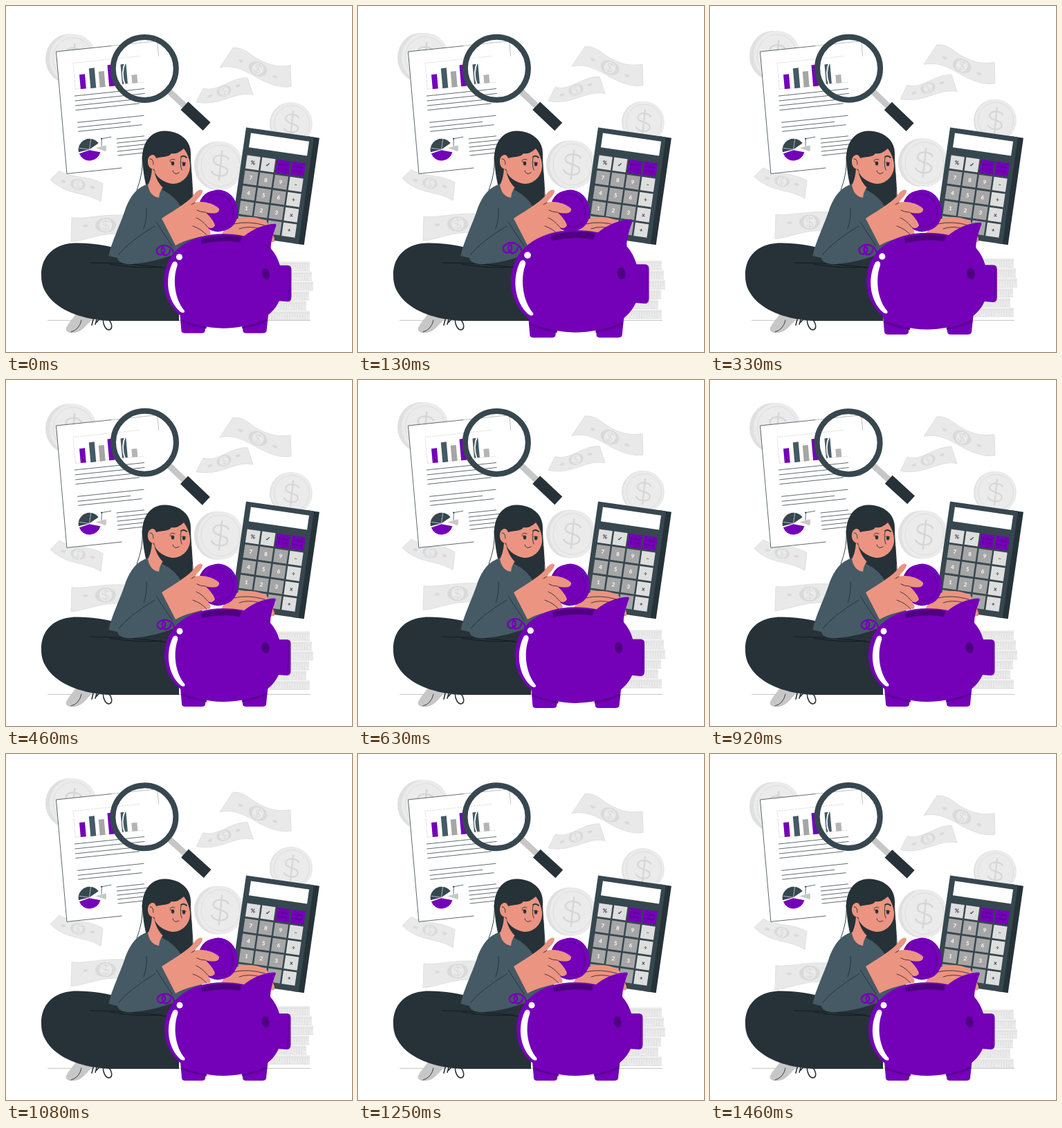
Recreate the animation shown at these times as an HTML page. Size 500 px wide and 500 px high, loop 1500 ms.

```html
<!DOCTYPE html>
<html lang="en">
<head>
<meta charset="utf-8">
<title>Saving money</title>
<style>
  html, body { margin: 0; width: 100%; height: 100%; overflow: hidden; background: #fff; }
  svg { display: block; width: 100%; height: 100%; }
  text { font-family: Lato, sans-serif; text-anchor: middle; }
  .line { fill: none; stroke: #263238; stroke-width: .9; stroke-linecap: round; stroke-linejoin: round; }
  .thin { fill: none; stroke: #263238; stroke-width: .3; }
  .faint { fill: none; stroke: #dcdcdc; stroke-width: .9; }
  .dark { fill: #263238; }
  .slate { fill: #455a64; }
  .purple { fill: #7400b8; }
  .shade { fill: none; stroke: #5d0094; }
  .deep { fill: #4f0080; }
  .skin { fill: #eb9481; }
  .gray { fill: #ebebeb; }
</style>
</head>
<body>
<svg viewBox="0 0 500 500">
  <path class="thin" d="M60 454.300H440"/>
  <g id="floating"></g>

  <g id="paper" transform="translate(72.500 66) rotate(-6) skewX(-1)"></g>

  <g id="lens">
    <path d="M173 80Q165 97 172 114" fill="none" stroke="#fff" stroke-width="1.800"/>
    <g transform="translate(200.500 90.500) rotate(43)">
      <path fill="#c7c7c7" d="M47 -4.500H86V4.500H47Z"/>
      <path class="dark" d="M78.500 -8H122.500V8H78.500Z"/>
    </g>
    <circle cx="200.200" cy="90.500" r="45.500" fill="none" stroke="#37474f" stroke-width="8"/>
  </g>

  <g id="calculator" transform="translate(347 175.500) rotate(8.200)"></g>

  <g id="woman">
    <path class="dark" d="M230 180.500C206 180 196 202 197 222C198 238 200 250 203 262L230 290L269 270C270 255 266 240 267 215C268 193 250 181 230 180.500Z"/>
    <path class="line" d="M197 218C198 238 194 252 189 266M266 215Q268 240 270.500 279"/>
    <path fill="#c7c7c7" d="M86.500 467C88 460 97 452 102 443L128 450C120 456 114 466 106 470C98 474 87 473 86.500 467Z"/>
    <path class="line" d="M94 471Q106 468 109 454"/>
    <path class="line" style="stroke-width:1.600" d="M142 449C138 456 143 468 149 468C156 466 152 454 145 451M127 449L124 461M132 450L129 460M137 450L131 457"/>
    <path class="dark" d="M51 390C50 360 72 342 103 342.500C126 343 146 346 164 351L250 352V455H150C110 453 82 441 66 425C55 413 51 403 51 390Z"/>
    <path class="line" style="stroke:#11191d" d="M122 371Q180 371 232 379M150 373Q190 380 225 377"/>
    <path class="slate" d="M206 257C190 261 180 274 173 292C166 314 152 342 148.500 361L161 364C162 371 172 374 183 373C205 371 224 366 240 360L285 340L268 282L232 262Z"/>
    <path class="dark" d="M226 254L268 240L270 281L254 292Q246 276 225 265Z"/>
    <path class="line" d="M203 292Q204 308 199 322M163 359Q178 340 215 318M217 312L240 347"/>
    <path class="skin" d="M211 235Q210 250 205 259Q208 275 221 277Q222 264 233 256Z"/>
    <path class="dark" d="M214 238Q220 253 240 257L227 263Q217 253 214 238Z"/>
    <path class="skin" d="M217 220C227 217 235 219 239 213Q247 215 257 206C262 213 266 222 266 231C266 245 255 257 241 257C228 256 219 247 214 236C206 236 203 226 206 219C210 213 215 214 217 220Z"/>
    <path class="line" d="M208 221Q213 220 213 229M253 219Q251 229 254 237M241 238Q243 245 250 241M237 223Q240 220 244 222"/>
    <path class="line" style="stroke-width:1.800" d="M253 218Q257 215 261 219"/>
    <ellipse class="dark" cx="241" cy="227.500" rx="2.200" ry="3"/>
    <ellipse class="dark" cx="257" cy="228.500" rx="2.200" ry="3"/>
    <path class="line" d="M237 225L242 226M254 226L260 227"/>

    <path class="skin" d="M308 338C313 324 323 311 338 306C351 303 368 306 377 312Q384 325 388 336V341H308Z"/>
    <path class="line" d="M329 315Q350 310 374 317M337 322Q350 317 368 322"/>
    <g transform="rotate(-15 306 296)">
      <ellipse class="purple" cx="304" cy="296" rx="26" ry="30"/>
      <ellipse class="purple" cx="309" cy="296" rx="26" ry="30"/>
      <path class="shade" d="M296 268Q282 279 284 296Q285 315 299 325"/>
      <ellipse class="shade" cx="309" cy="296" rx="19" ry="24"/>
    </g>
    <path class="skin" d="M225 307C240 297 258 287 270 275C275 267 281 263 284 267C284 273 276 279 273 284C286 281 301 286 308 293C309 300 300 301 288 298C295 304 301 312 302 317C299 322 295 322 291 319C296 325 298 332 291 331C278 334 258 338 245 346Z"/>
    <path class="line" d="M273 284L268 287M288 298Q281 298 276 295M291 319Q284 310 275 306M290 331Q282 322 270 318"/>
  </g>

  <g id="pig">
    <path d="M244 363C244 346 226 342 219 352C218 361 227 362 230 355C231 347 224 348 226 356C228 363 237 361 238 353" fill="none" stroke="#7400b8" stroke-width="2.400" stroke-linecap="round"/>
    <path class="purple" d="M252 445L254 468Q254 472 259 472H283Q288 472 288 468L291 445ZM340 445L342 468Q342 472 347 472H370Q376 472 376 468L379 440Z"/>
    <path class="shade" stroke-width="3" d="M254 454Q270 461 290 464M341 464Q360 461 377 453"/>
    <path class="purple" d="M229 398C229 357 263 330 314 330C324 330 335 331 344 333C355 324 371 316 388 315.500Q391 316 389 320C385 331 382 342 382 351Q391 361 395 375H406Q411.500 375 411.500 381V420Q411.500 427 406 427L394 426C383 451 352 465 314 465C264 465 229 439 229 398Z"/>
    <path class="shade" d="M408 378Q410 401 407 424M382 351Q377 346 371 345"/>
    <path class="deep" d="M282 337C300 331 323 331 341 334L338 342C320 339 302 340 283 344Z"/>
    <ellipse class="deep" cx="375" cy="387" rx="5.500" ry="8" transform="rotate(-10 375 387)"/>
    <circle cx="251" cy="363" r="4.500" fill="#fff"/>
    <path fill="#fff" d="M241 372C244 367 250 370 248 376C241 396 245 424 258 439C260 443 256 444 252 441C234 425 230 395 241 372Z"/>
  </g>
</svg>

<script>
const $ = id => document.getElementById(id);
const range = n => [...Array(n).keys()];

// A thin dollar sign of the given height.
const dollar = (x, y, height, tilt) =>
  `<path transform="translate(${x} ${y}) rotate(${tilt}) scale(${height / 36})" fill="none" stroke="#d6d6d6"
    stroke-width="2" d="M9 -8C7 -14 -9 -14 -9 -6C-9 2 9 -2 9 6C9 14 -8 14 -10 7M0 -18V18"/>`;

function coin(x, y, rx, ry, depth) {
  return `<ellipse cx="${x - depth}" cy="${y}" rx="${rx}" ry="${ry}" fill="#e0e0e0"/>
    <ellipse class="gray" cx="${x}" cy="${y}" rx="${rx}" ry="${ry}"/>
    <ellipse class="faint" cx="${x}" cy="${y}" rx="${rx * .85}" ry="${ry * .85}"/>` +
    dollar(x, y, ry * 1.25, 6);
}

function bill(outline, x, y, r, tilt) {
  const dot = side => `<ellipse cx="${side * r * 1.95}" rx="3.500" ry="2"/>`;
  return `<path d="${outline}" fill="#e9e9e9" stroke="#e0e0e0"/>
    <g transform="translate(${x} ${y}) rotate(${tilt})" fill="#dadada">
      <ellipse rx="${r}" ry="${r * .72}"/>${dot(-1)}${dot(1)}
      <ellipse class="gray" rx="${r * .6}" ry="${r * .6}"/>${dollar(0, 0, r * 1.2, 0)}</g>`;
}

function bundle(right, i) {
  const y = 369.5 + i * 14.2;
  const ticks = range(15).map(k => `M${right - 3 - k * 3.7} ${y + 4}v${4 + k * 5 % 6}`).join("");
  return `<path class="gray" d="M375 ${y}H${right}V${y + 13}H375Z"/>
    <path class="faint" d="M375 ${y + 3}H${right}M375 ${y + 13}H${right}${ticks}"/>`;
}

$("floating").innerHTML =
  coin(97, 76.5, 34, 36, 6) + coin(310, 231, 33, 35, 5) + coin(413, 170, 30, 30.5, 2) +
  bill("M328 60.500C346 60 352 71 366 78C381 86 395 89 411 86L412 116.500C397 119 383 114 367 106C350 97 333 84 309 89Z", 364, 91, 14, 25) +
  bill("M285 119C305 126 325 103 349 104L357 128.500C332 122 310 146 275 139Z", 315, 123, 11, -20) +
  bill("M77 238.500C95 250 118 244 140 257L137 283C115 268 88 275 64 251Z", 104, 258, 11, 12) +
  bill("M95 306C120 309 140 298 190 304V335C150 320 120 339 94 341Z", 144, 317, 15, -2) +
  [439, 442, 444, 438, 434, 439].map(bundle).join("");

// Bars: x, top, bottom, colour; rules: x, y, length.
const bars = [
  [34.500, 36.500, 57.500, "#7400b8"], [49, 29, 58, "#455a64"], [62.500, 35, 58, "#a6a6a6"],
  [76, 27, 58, "#7400b8"], [95, 28, 56.500, "#455a64"], [109.500, 45, 57, "#b5b5b5"]];
const rules = [
  [21, 66.500, 101], [21, 73.500, 101], [21, 80.500, 97], [21, 87, 92],
  [22, 105, 96], [22, 112, 76], [22, 118, 92],
  ...range(5).map(i => [76, 134.500 + i * 6, 40 + i % 2 * 4])];
$("paper").innerHTML = `
  <path fill="#fff" d="M0 0H147V177H0Z"/>
  <path class="thin" style="stroke-width:.7" d="M80 0H0V177H80"/>
  <path class="thin" d="M80 0H147V22"/>
  <path class="faint" d="M23 57V19H120M23 57H122" stroke-dasharray="3 1"/>` +
  bars.map(([x, top, bottom, fill]) =>
    `<path d="M${x - 4} ${top}h8V${bottom}h-8Z" fill="${fill}"/>`).join("") +
  `<path class="line" style="stroke-width:.7" d="${rules.map(([x, y, w]) => `M${x} ${y}h${w}`).join("")}"/>
  <g transform="translate(35.500 145.500) rotate(6)">
    <path fill="#37474f" d="M0 0L-15.500 4A16 16 0 0 1 13 -9Z"/>
    <path class="purple" d="M0 1L-14.500 6A16 16 0 0 0 16 4Z"/>
    <path fill="#c7c7c7" d="M9 -2L24 -6Q25 -1 24 3Z"/>
    <path d="M0 0L2 -16M0 0L-15 -2" stroke="#fff" stroke-width=".600"/>
    <path class="line" style="stroke-width:.700" d="M17.500 -5V-15.500L31 -18"/>
    <circle class="slate" cx="17.500" cy="-15.500" r="1.300"/>
  </g>`;

function key(label, i) {
  const col = i % 4, row = i >> 2;
  const light = col === 3 || row === 0, special = row === 0 && col > 1;
  const fill = special ? "#7400b8" : light ? "#dedede" : "#a6a6a6";
  const face = special
    ? `<path d="M-7 -3H7M-7 3H7" stroke="#5d0094" stroke-width="2" stroke-dasharray="3 1.500 5 1"/>`
    : `<text y="2.800" font-size="8" font-weight="700" fill="${light ? "#263238" : "#fff"}">${label}</text>`;
  return `<g transform="translate(${17 + col * 21.900} ${49 + row * 22.200})">
    <path d="M-9.700 -9.700H9.700V9.700H-9.700Z" fill="${fill}"/>${face}</g>`;
}
$("calculator").innerHTML = `
  <path class="dark" d="M90 0H107V156H90Z"/>
  <path fill="#37474f" d="M0 0H99V156H0Z"/>
  <path fill="#fff" d="M8 7H93V28H8Z"/>` +
  [..."%✓  789–456÷123x0.=+"].map(key).join("");

// Linear interpolation through [position, value] stops.
function track(stops, p) {
  const i = stops.findIndex(([at]) => at >= p);
  if (i < 1) return stops[0][1];
  const [a, from] = stops[i - 1], [b, to] = stops[i];
  return from + (to - from) * (p - a) / (b - a);
}
const beat = [[0, 1], [.1, 1.1], [.3, 1], [.4, 1], [.5, 1.1], [.6, 1], [1, 1]];
const sway = [[0, 0], [.25, 1], [.75, -1], [1, 0]];
const lift = [[0, 0], [.5, -10], [1, 0]];

const LOOP = 1500, STEPS = 36;
function draw(now) {
  const step = Math.floor((now % LOOP + 5) * STEPS / LOOP) % STEPS;
  const p = step / STEPS + .01;
  $("floating").setAttribute("transform", `translate(0 ${track(lift, p)})`);
  $("lens").setAttribute("transform", `rotate(${track(sway, p)} 223 110)`);
  $("pig").setAttribute("transform", `translate(315 394) scale(${track(beat, p)}) translate(-315 -394)`);
}
const start = performance.now();
function tick() {
  draw(performance.now() - start);
  requestAnimationFrame(tick);
}
tick();
</script>
</body>
</html>
```
